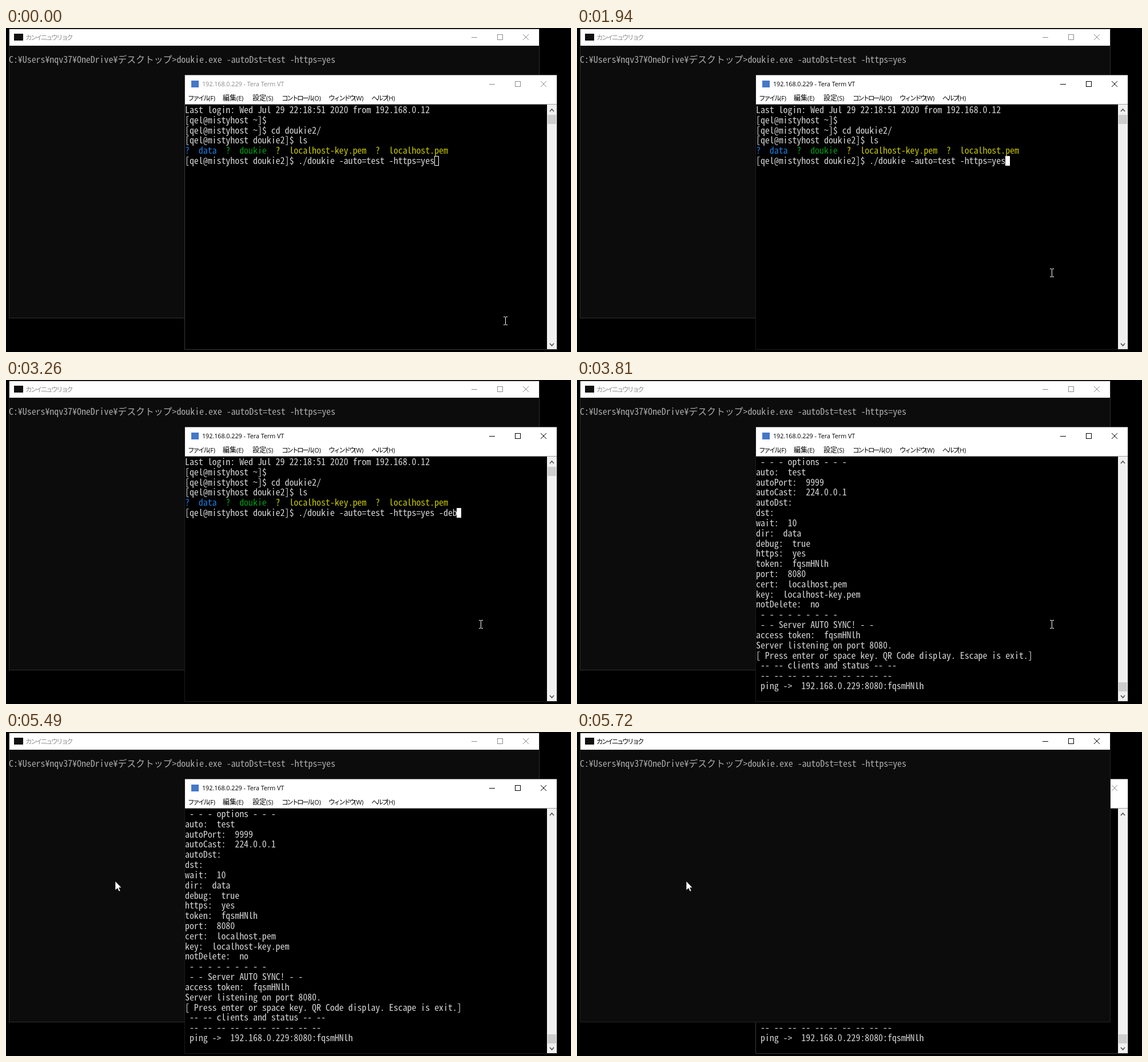
Animation, 988 px wide and 567 px high, one loop 8000 ms. Source, as an HTML page with a canvas:

```html
<!DOCTYPE html>
<html lang="ja">
<head>
<meta charset="utf-8">
<title>Terminal session</title>
<style>
  html, body { margin: 0; width: 100%; height: 100%; overflow: hidden; background: #000; }
  canvas { display: block; }
</style>
</head>
<body>
<canvas id="stage" width="988" height="567"></canvas>
<script>
const ctx = document.getElementById('stage').getContext('2d');
const LOOP = 8000;
const CELL = 7.93, ROW = 17.82;
const MONO = '300 15.86px "Noto Sans Mono CJK JP", "Noto Sans CJK JP", "Noto Sans Mono", monospace';
const LATIN = '10.7px "Open Sans", "Noto Sans", sans-serif';
const KANJI = '12px "Noto Sans CJK JP", "Noto Sans CJK", sans-serif';
const KANA = '11.5px "Noto Sans CJK JP", "Noto Sans CJK", sans-serif';

const FOCUS_TERM = 380, OUTPUT = 3730, PING = 3810, FOCUS_CMD = 5550;
const TYPED = ' -debug';
const KEY_TIMES = [2340, 2650, 2870, 2950, 3260, 3420, 3500];
const PROMPT = '[qel@mistyhost doukie2]$ ';
const COMMAND = PROMPT + './doukie -auto=test -https=yes';

const shell = [
  'Last login: Wed Jul 29 22:18:51 2020 from 192.168.0.12',
  '[qel@mistyhost ~]$',
  '[qel@mistyhost ~]$ cd doukie2/',
  PROMPT + 'ls'
];
const listing = [
  [0, '?  data', '#1a7ce0'],
  [9, '?  doukie', '#009c18'],
  [20, '?  localhost-key.pem', '#c8c800'],
  [42, '?  localhost.pem', '#c8c800']
];
const output = [
  ' - - - options - - -',
  'auto:  test',
  'autoPort:  9999',
  'autoCast:  224.0.0.1',
  'autoDst:',
  'dst:',
  'wait:  10',
  'dir:  data',
  'debug:  true',
  'https:  yes',
  'token:  fqsmHNlh',
  'port:  8080',
  'cert:  localhost.pem',
  'key:  localhost-key.pem',
  'notDelete:  no',
  ' ' + '- '.repeat(9),
  ' - - Server AUTO SYNC! - -',
  'access token:  fqsmHNlh',
  'Server listening on port 8080.',
  '[ Press enter or space key. QR Code display. Escape is exit.]',
  ' -- -- clients and status -- --',
  ' ' + '-- '.repeat(10),
  ' ping ->  192.168.0.229:8080:fqsmHNlh'
];
const menu = [
  ['ファイル(F)', 318], ['編集(E)', 379], ['設定(S)', 431],
  ['コントロール(O)', 482], ['ウィンドウ(W)', 564], ['ヘルプ(H)', 639]
];

function rect(x, y, w, h, color) {
  ctx.fillStyle = color;
  ctx.fillRect(x, y, w, h);
}

function frame(x, y, w, h, color) {
  ctx.strokeStyle = color;
  ctx.lineWidth = 1;
  ctx.strokeRect(x + 0.5, y + 0.5, w - 1, h - 1);
}

function line(points, color, width = 1) {
  ctx.beginPath();
  points.forEach(([x, y], i) => i ? ctx.lineTo(x, y) : ctx.moveTo(x, y));
  ctx.strokeStyle = color;
  ctx.lineWidth = width;
  ctx.stroke();
}

// Console text on a fixed grid; kana take two cells.
function gridText(str, x, y, color) {
  ctx.font = MONO;
  ctx.fillStyle = color;
  ctx.textAlign = 'center';
  for (const ch of str) {
    const w = ch >= '\u3000' ? 2 * CELL : CELL;
    ctx.fillText(ch, x + w / 2, y);
    x += w;
  }
}

function termText(str, row, color = '#d6d6d6', col = 0) {
  gridText(str, 313 + col * CELL, 149 + row * ROW, color);
}

// Interface label with narrow kana, full kanji and Latin runs.
function label(str, x, y, color) {
  ctx.textAlign = 'left';
  ctx.fillStyle = color;
  for (const run of str.match(/[\u30a0-\u30ff]+|[\u4e00-\u9fff]+|[ -~]+/g)) {
    const kana = run[0] >= '\u30a0' && run[0] <= '\u30ff';
    ctx.font = kana ? KANA : run[0] > '~' ? KANJI : LATIN;
    ctx.letterSpacing = kana ? '-2.5px' : '0px';
    ctx.fillText(run, x, y);
    x += ctx.measureText(run).width;
  }
  ctx.letterSpacing = '0px';
}

function windowButtons(x, y, color) {
  rect(x - 5, y, 10, 1, color);
  frame(x + 40, y - 5, 10, 10, color);
  line([[x + 85, y - 5], [x + 95, y + 5]], color);
  line([[x + 95, y - 5], [x + 85, y + 5]], color);
}

function drawCmd(active) {
  const ink = active ? '#000' : '#8c8c8c';
  rect(5, 1, 928, 507, '#0c0c0c');
  frame(5, 1, 928, 507, active ? '#242424' : '#303030');
  rect(6, 2, 926, 29, '#fff');
  rect(14, 10, 16, 12, '#111');
  label('カンイニュウリョク', 34, 20.5, ink);
  windowButtons(819, 16, ink);
  gridText('C:¥Users¥nqv37¥OneDrive¥デスクトップ>doukie.exe -autoDst=test -https=yes', 5, 61, '#acacac');
}

function drawScrollbar(thumbY) {
  rect(946, 134, 17, 428, '#f0f0f0');
  rect(947, thumbY, 15, 16, '#cdcdcd');
  line([[951, 146], [954.5, 142], [958, 146]], '#505050', 1.6);
  line([[951, 552], [954.5, 556], [958, 552]], '#505050', 1.6);
}

function drawCaret(t, typed) {
  const x = Math.floor(313 + (COMMAND.length + typed) * CELL);
  if (t < FOCUS_TERM) frame(x, 224, 8, 17, '#fff');
  else if ((t >= 910 && t < 1470) || t >= 1940) rect(x, 224, 8, 17, '#fff');
}

function drawTerm(t, active) {
  const ink = active ? '#000' : '#8c8c8c';
  rect(312, 82, 652, 481, '#000');
  frame(312, 82, 652, 481, active ? '#1c1c1c' : '#383838');
  rect(313, 82.5, 650, 50.5, '#fff');
  rect(313, 133, 650, 1, '#a0a0a0');
  rect(324, 92, 13, 12, '#4478c8');
  label('192.168.0.229 - Tera Term VT', 343, 102, ink);
  windowButtons(850, 98, ink);
  for (const [name, x] of menu) label(name, x, 126.5, '#000');

  if (t < OUTPUT) {
    const typed = KEY_TIMES.filter(k => t >= k).length;
    shell.forEach((str, row) => termText(str, row));
    for (const [col, str, color] of listing) termText(str, 4, color, col);
    termText(COMMAND + TYPED.slice(0, typed), 5);
    drawCaret(t, typed);
    drawScrollbar(152);
  } else {
    const shown = t < PING ? output.length - 1 : output.length;
    output.slice(0, shown).forEach((str, row) => termText(str, row));
    drawScrollbar(529);
  }
}

// The pointer moves in discrete samples, as a screen recorder sees it.
function glide(t, start, step, count, from, to) {
  const k = Math.min(count, Math.max(0, Math.floor((t - start) / step) + 1));
  const u = k / count, e = u * u * (3 - 2 * u);
  return from.map((v, i) => Math.round(v + (to[i] - v) * e));
}

function pointerAt(t) {
  if (t < 2090) return glide(t, 70, 77, 4, [873, 512], [830, 428]);
  if (t < 5490) return glide(t, 4690, 80, 7, [830, 427], [194, 261]);
  return [191, 261];
}

function drawPointer(t) {
  const [x, y] = pointerAt(t);
  if (x > 313) {
    rect(x, y - 6, 1, 13, '#fff');
    for (const dy of [-7, 7]) {
      rect(x - 3, y + dy, 3, 1, '#fff');
      rect(x + 1, y + dy, 3, 1, '#fff');
    }
    return;
  }
  if (t >= FOCUS_CMD && t < 5720) {
    ctx.beginPath();
    ctx.arc(190, 260, 12, 0, 7);
    ctx.fillStyle = 'rgba(255,255,0,.47)';
    ctx.fill();
  }
  const arrow = [[0, 0], [0, 16], [4, 12.5], [6.5, 18], [9, 17], [6.5, 11.5], [11, 11.5]];
  ctx.beginPath();
  for (const [dx, dy] of arrow) ctx.lineTo(x + dx, y + dy);
  ctx.closePath();
  ctx.fillStyle = '#fff';
  ctx.fill();
  ctx.strokeStyle = '#000';
  ctx.lineWidth = 0.6;
  ctx.stroke();
}

function draw(t) {
  rect(0, 0, 988, 567, '#000');
  if (t < FOCUS_CMD) {
    drawCmd(false);
    drawTerm(t, t >= FOCUS_TERM);
  } else {
    drawTerm(t, false);
    drawCmd(true);
  }
  drawPointer(t);
}

const begin = performance.now();
function tick() {
  draw((performance.now() - begin) % LOOP);
  requestAnimationFrame(tick);
}
tick();
</script>
</body>
</html>
```
